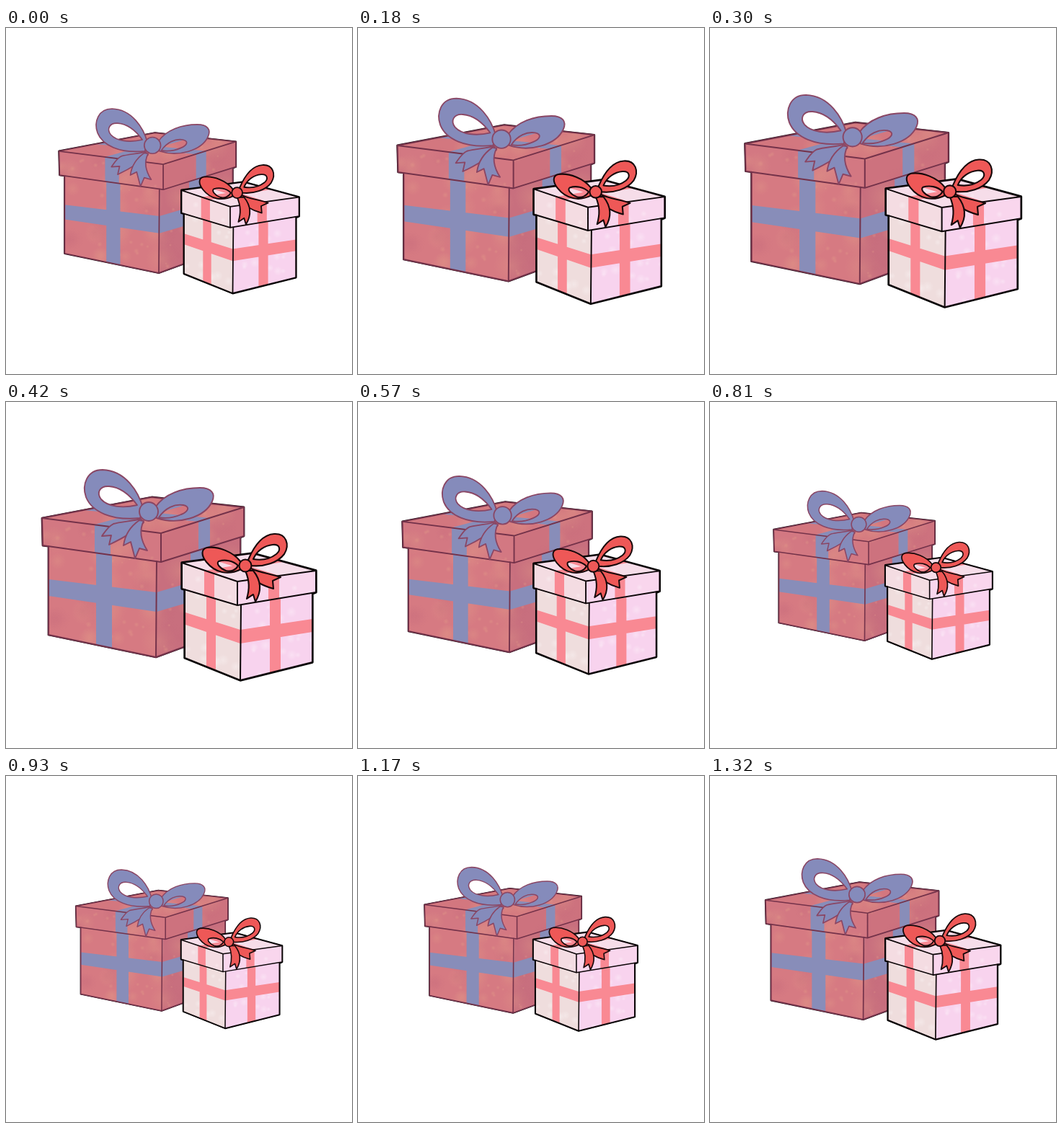
Animation of 480x480 px, one loop 1350 ms. Source, as an HTML page:

```html
<!DOCTYPE html>
<html>
<head>
<meta charset="utf-8">
<style>
  html, body { margin: 0; height: 100%; overflow: hidden; background: #fff; }
  svg { display: block; width: 480px; height: 480px; }
  path, circle { stroke-linejoin: round; stroke-linecap: round; }
  .edge { fill: none; stroke-width: 2; }
  #big .edge { stroke: #74324a; }
  #big .rim { fill: none; stroke: #1b0b12; stroke-width: 2.8; }
  #big .ribbon { fill: #888db9; }
  #big .bow { fill: #858bbb; stroke: #8a4664; stroke-width: 1.9; }
  #small .edge { stroke: #0c0608; }
  #small .rim { fill: none; stroke: #000; stroke-width: 3.4; }
  #small .ribbon { fill: #f98993; }
  #small .bow { fill: #ee5857; stroke: #16080a; stroke-width: 2.1; }
</style>
</head>
<body>
<svg viewBox="0 0 480 480">
  <defs>
    <radialGradient id="warm"><stop stop-color="#e39c88"/><stop offset="1" stop-color="#e39c88" stop-opacity="0"/></radialGradient>
    <radialGradient id="rose"><stop stop-color="#c4687a"/><stop offset="1" stop-color="#c4687a" stop-opacity="0"/></radialGradient>
    <radialGradient id="pale"><stop stop-color="#fff"/><stop offset="1" stop-color="#fff" stop-opacity="0"/></radialGradient>
    <clipPath id="bigClip"><path d="M50 160L202 131L330 145V185L325 187V310L208 353L59 322V199L51 198Z"/></clipPath>
    <clipPath id="smallClip"><path d="M244 222L342 209L430 233V263L425 265V360L325 385L248 354V259L244 258Z"/></clipPath>
  </defs>
  <g id="scene">
    <g id="big">
      <path class="rim" d="M50 160L202 131L330 145V185L325 187V310L208 353L59 322V199L51 198Z"/>
      <path fill="#d67a82" d="M59 199L210 220L208 353L59 322Z"/>
      <path fill="#c86f7e" d="M210 220L325 187V310L208 353Z"/>
      <path fill="#d3777f" d="M50 160L202 131L330 145L215 181Z"/>
      <path fill="#d37882" d="M50 160L215 181V221L51 198Z"/>
      <path fill="#cd727e" d="M215 181L330 145V185L215 221Z"/>
      <g id="bigTexture" clip-path="url(#bigClip)"></g>
      <path class="ribbon" d="M125 208L147 211V341L125 336ZM59 245L209 263V290L59 268ZM209 263L325 229V256L209 290ZM256 208L274 203V329L256 335Z"/>
      <path class="ribbon" d="M123 169L145 172V211L123 208ZM267 165L283 160V200L267 205ZM123 169L245 136L263 138L145 172ZM267 165L108 149L130 145L283 160Z"/>
      <path class="edge" d="M59 199V322L208 353L325 310V187M209 220L208 353"/>
      <path class="edge" d="M50 160L215 181L330 145V185L215 221L51 198ZM215 181V221M50 160L202 131L330 145"/>
      <path class="bow" d="M187 161C178 164 159 165 149 168C142 171 138 178 133 185L146 184L143 197C158 190 177 180 191 166Z"/>
      <path class="bow" d="M185 163C172 172 165 183 163 198L173 193L179 216L185 202L196 205C187 191 184 178 191 164Z"/>
      <g transform="translate(0 -1)">
        <path class="bow" fill-rule="evenodd" d="M190 147C184 125 166 95 134 94C112 94 105 115 111 132C119 152 146 165 186 161ZM182 143C171 128 158 118 143 117C130 116 125 126 132 135C141 145 161 148 182 143Z"/>
        <path class="bow" fill-rule="evenodd" d="M207 146C220 127 245 119 269 119C285 119 291 127 286 138C276 160 239 171 209 161ZM212 160C221 147 234 141 246 143C256 145 253 152 243 156C234 160 222 162 212 160Z"/>
        <circle class="bow" cx="198" cy="152" r="13"/>
      </g>
    </g>
    <g id="small">
      <path class="rim" d="M244 222L342 209L430 233V263L425 265V360L325 385L248 354V259L244 258Z"/>
      <path fill="#efdddd" d="M248 258L326 280L325 385L248 354Z"/>
      <path fill="#f8d3ee" d="M326 280L425 263V360L325 385Z"/>
      <path fill="#f6dde9" d="M244 222L342 209L430 233L321 248Z"/>
      <path fill="#f4dce2" d="M244 222L321 248V281L244 258Z"/>
      <path fill="#f9d6ed" d="M321 248L430 233V263L321 281Z"/>
      <g id="smallTexture" clip-path="url(#smallClip)"></g>
      <path class="ribbon" d="M278 268L291 272V371L278 366ZM249 291L325 315V334L249 308ZM325 315L425 300V318L325 334ZM366 274L381 272V371L366 375Z"/>
      <path class="ribbon" d="M275 233L289 237V271L275 267ZM364 242L379 240V271L364 274ZM275 233L370 217L384 221L289 237ZM364 242L284 217L300 215L379 240Z"/>
      <path class="edge" d="M248 259V354L325 385L425 360V264M326 281L325 385"/>
      <path class="edge" d="M244 222L321 248L430 233V263L321 281L244 258ZM321 248V281M244 222L342 209L430 233"/>
      <path class="bow" d="M340 230C352 236 368 237 381 242L370 247L371 258C356 254 342 246 333 235Z"/>
      <path class="bow" d="M332 233C338 247 338 258 334 272L343 266L346 276C354 263 355 248 343 233Z"/>
      <g transform="translate(0 -1)">
        <path class="bow" fill-rule="evenodd" d="M325 221C315 208 295 200 279 202C270 204 271 213 278 222C290 237 308 241 326 232ZM322 227C315 220 304 218 295 221C291 224 297 231 305 234C312 236 319 233 322 227Z"/>
        <path class="bow" fill-rule="evenodd" d="M336 219C344 200 355 184 372 183C389 182 394 198 386 211C377 223 358 229 340 227ZM343 218C348 206 359 199 370 198C380 197 382 205 375 211C366 218 355 220 343 218Z"/>
        <circle class="bow" cx="332" cy="227" r="8.5"/>
      </g>
    </g>
  </g>
</svg>
<script>
  const byId = id => document.getElementById(id);
  const PERIOD = 1350, STEP = 30, AMPLITUDE = 0.152, DRAWN_SCALE = 1.141;

  let seed = 7;
  const random = () => (seed = seed * 16807 % 2147483647) / 2147483647;

  // Soft paper mottling across a box
  function mottle(id, fill, count, [x, y, w, h], radius, opacity) {
    let marks = '';
    for (let i = 0; i < count; i++) {
      marks += `<circle cx="${x + random() * w}" cy="${y + random() * h}" r="${radius * (0.5 + random())}" fill="url(#${fill})" opacity="${opacity}"/>`;
    }
    byId(id).innerHTML += marks;
  }
  const bigArea = [50, 130, 280, 220], smallArea = [244, 210, 186, 172];
  mottle('bigTexture', 'warm', 40, bigArea, 18, 0.3);
  mottle('bigTexture', 'rose', 30, bigArea, 14, 0.25);
  mottle('bigTexture', 'warm', 70, bigArea, 3, 0.4);
  mottle('smallTexture', 'pale', 50, smallArea, 6, 0.3);

  function draw(now) {
    const time = Math.floor(now % PERIOD / STEP) * STEP;
    const scale = (1 + AMPLITUDE * Math.sin(2 * Math.PI * time / PERIOD)) / DRAWN_SCALE;
    byId('scene').setAttribute('transform', `translate(240 240) scale(${scale}) translate(-240 -239)`);
    requestAnimationFrame(draw);
  }
  draw(performance.now());
</script>
</body>
</html>
```
